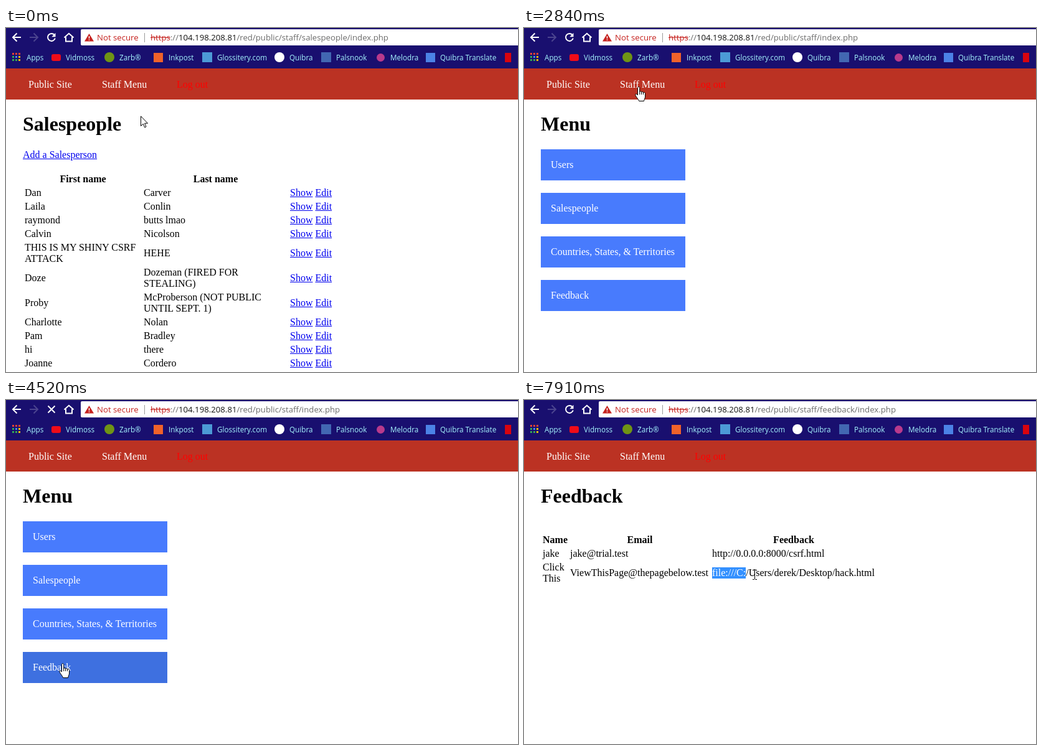
Recreate the animation shown at these times as an HTML page. Size 822x553 px, loop 8000 ms.

```html
<!DOCTYPE html>
<html lang="en">
<head>
<meta charset="utf-8">
<title>Staff area</title>
<style>
html, body { margin: 0; width: 100%; height: 100%; overflow: hidden; background: #fff; }
#stage { position: relative; width: 822px; height: 553px; overflow: hidden; font: 16px/18px "Liberation Serif", "Times New Roman", serif; color: #000; white-space: nowrap; }
#stage > *, .page > *, .nav *, .marks *, .bar > * { position: absolute; }

/* browser frame */
.top { left: 0; top: 0; width: 822px; height: 65px; background: #190f6f; }
.bar { left: 120px; top: 2px; width: 710px; height: 26px; background: #fff; border-radius: 2px; font: 13.2px/26px "Open Sans", "Noto Sans", sans-serif; }
.warn { left: 26px; color: #c5221f; }
.rule { left: 102px; top: 6px; width: 1px; height: 15px; background: #9a9a9a; }
.url { left: 112px; color: #6b6b6b; }
.url s { color: #c5221f; }
.url b { font-weight: 400; color: #111; }
.path { position: relative; }
.path i { position: absolute; left: 0; top: -4px; font-style: normal; line-height: 26px; }
.marks { left: 0; top: 37px; font: 11.7px/20px "Open Sans", "Noto Sans", sans-serif; color: #a6f6ff; }
.nav { left: 0; top: 65px; width: 822px; height: 50px; background: #bb3223; color: #fff; }
.nav span { top: 17px; }

/* pages */
.page { left: 0; top: 115px; width: 822px; height: 438px; background: #fff; }
h1 { margin: 0; left: 27px; top: 21px; font-size: 32px; line-height: 37px; }
u { color: #00e; }
table { left: 27px; border-spacing: 2px; table-layout: fixed; }
td, th { padding: 1px; box-sizing: border-box; }
td { text-align: left; }
.btn { left: 27px; width: 216px; height: 50px; padding-left: 16px; line-height: 50px; color: #fff; background: #487bfd; }
.sel { left: 302px; top: 154px; color: #fff; background: #3390ff; }

/* timing */
.t { animation: 8s step-end infinite; }
#sales { animation-name: sales; }
#menu { animation-name: menu; }
#feed { animation-name: feed; }
#u1 { animation-name: u1; }
#u2 { animation-name: u2; }
#u3 { animation-name: feed; }
#load { animation-name: load; }
#stop { animation-name: stop; }
#b1 { animation-name: b1; }
#b2 { animation-name: b2; }
#b3 { animation-name: b3; }
#b4 { animation-name: b4; }
#s1 { animation-name: s1; }
#s2 { animation-name: s2; }
#arrow { animation-name: arrow; }
#hand { animation-name: hand; }
#beam { animation-name: beam; }
#cursor { left: 0; top: 0; animation-name: move; }
#cursor svg { position: absolute; overflow: visible; }

@keyframes sales { 0% { visibility: visible } 35.5%, 100% { visibility: hidden } }
@keyframes menu { 0% { visibility: hidden } 35.5% { visibility: visible } 58.375%, 100% { visibility: hidden } }
@keyframes feed { 0% { visibility: hidden } 58.375%, 100% { visibility: visible } }
@keyframes u1 { 0% { visibility: visible } 33.625%, 100% { visibility: hidden } }
@keyframes u2 { 0% { visibility: hidden } 33.625% { visibility: visible } 58.375%, 100% { visibility: hidden } }
@keyframes load { 0%, 35.5%, 58.375%, 100% { opacity: 1 } 26.875%, 56.5% { opacity: 0 } }
@keyframes stop { 0%, 35.5%, 58.375%, 100% { opacity: 0 } 26.875%, 56.5% { opacity: 1 } }
@keyframes b1 { 0%, 44.5%, 100% { background: #487bfd } 42.75% { background: #3e70e0 } }
@keyframes b2 { 0%, 49.75%, 100% { background: #487bfd } 44.5% { background: #3e70e0 } }
@keyframes b3 { 0%, 53.25%, 100% { background: #487bfd } 49.75% { background: #3e70e0 } }
@keyframes b4 { 0% { background: #487bfd } 53.25%, 100% { background: #3e70e0 } }
@keyframes s1 { 0%, 98.875%, 100% { opacity: 0 } 97% { opacity: 1 } }
@keyframes s2 { 0% { opacity: 0 } 98.875%, 100% { opacity: 1 } }
@keyframes arrow {
  0%, 41.125%, 48%, 51.5%, 65.375% { opacity: 1 }
  13.625%, 42.75%, 49.75%, 53.25%, 70.625%, 100% { opacity: 0 }
}
@keyframes hand {
  0%, 41.125%, 48%, 51.5%, 65.375%, 100% { opacity: 0 }
  13.625%, 42.75%, 49.75%, 53.25% { opacity: 1 }
}
@keyframes beam { 0% { opacity: 0 } 70.625%, 100% { opacity: 1 } }
@keyframes move {
  0% { transform: translate(216px, 141px) }
  1.875% { transform: translate(218px, 141px) }
  5.25% { transform: translate(217px, 139px) }
  6.875% { transform: translate(214px, 134px) }
  8.625% { transform: translate(210px, 128px) }
  10.25% { transform: translate(206px, 122px) }
  12% { transform: translate(201px, 115px) }
  13.625% { transform: translate(196px, 107px) }
  15.375% { transform: translate(192px, 100px) }
  17% { transform: translate(189px, 96px) }
  18.5% { transform: translate(184px, 94px) }
  41.125% { transform: translate(152px, 165px) }
  42.75% { transform: translate(125px, 240px) }
  44.5% { transform: translate(117px, 272px) }
  46.25% { transform: translate(109px, 306px) }
  48% { transform: translate(104px, 332px) }
  49.75% { transform: translate(98px, 366px) }
  51.5% { transform: translate(94px, 398px) }
  53.25% { transform: translate(91px, 423px) }
  65.375% { transform: translate(150px, 395px) }
  67.125% { transform: translate(240px, 335px) }
  68.875% { transform: translate(320px, 291px) }
  70.625% { transform: translate(364px, 275px) }
  75.625% { transform: translate(395px, 283px) }
  77.375% { transform: translate(386px, 282px) }
  79.125% { transform: translate(373px, 281px) }
  80.875% { transform: translate(357px, 280px) }
  82.5% { transform: translate(341px, 279px) }
  84.25% { transform: translate(327px, 279px) }
  86% { transform: translate(316px, 279px) }
  87.75% { transform: translate(308px, 279px) }
  89.625% { transform: translate(306px, 279px) }
  91.5% { transform: translate(305px, 279px) }
  97% { transform: translate(334px, 280px) }
  98.875%, 100% { transform: translate(370px, 281px) }
}
</style>
</head>
<body>
<div id="stage">
  <div class="top"></div>
  <div class="bar">
    <span class="warn">Not secure</span><span class="rule"></span>
    <span class="url"><s>https</s>://<b>104.198.208.81</b><span class="path"><i class="t" id="u1">/red/public/staff/salespeople/index.php</i><i class="t" id="u2">/red/public/staff/index.php</i><i class="t" id="u3">/red/public/staff/feedback/index.php</i></span></span>
  </div>
  <svg style="left:0;top:0" width="160" height="65" fill="none" stroke="#fff" stroke-width="2">
    <path d="M24 15H11.500M17.500 8.500L11 15l6.500 6.500"/>
    <path d="M38 15h12.500M44.500 8.500L51 15l-6.500 6.500" stroke="#4b448f"/>
    <g class="t" id="load"><path d="M77.600 11A6 6 0 1 0 78.800 16.500"/><path d="M79.500 8v6.200h-6.200z" fill="#fff" stroke="none"/></g>
    <path class="t" id="stop" d="M67.500 9.500l11 11M78.500 9.500l-11 11"/>
    <path d="M93.500 15.500L101 8.800l7.500 6.700M96 14.500v7h10v-7"/>
    <path d="M133.500 9l7.500 12.500h-15z" fill="#c5221f" stroke="none"/>
    <path d="M133.500 13v4M133.500 18.200v1.600" stroke-width="1.500"/>
    <g stroke="none" id="grid"></g>
  </svg>
  <div class="marks" id="marks"></div>

  <div class="nav">
    <span style="left:36px">Public Site</span>
    <span style="left:154px">Staff Menu</span>
    <span style="left:274px;color:red">Log out</span>
  </div>

  <div class="page t" id="sales">
    <h1>Salespeople</h1>
    <u style="left:27px;top:80px">Add a Salesperson</u>
    <table style="top:116px;width:500px">
      <thead><tr><th style="width:189px">First name</th><th style="width:233px">Last name</th><th></th></tr></thead>
      <tbody id="people"></tbody>
    </table>
  </div>

  <div class="page t" id="menu">
    <h1>Menu</h1>
    <div class="btn t" id="b1" style="top:80px">Users</div>
    <div class="btn t" id="b2" style="top:150px">Salespeople</div>
    <div class="btn t" id="b3" style="top:220px">Countries, States, &amp; Territories</div>
    <div class="btn t" id="b4" style="top:290px">Feedback</div>
  </div>

  <div class="page t" id="feed">
    <h1>Feedback</h1>
    <table style="top:98px;width:540px">
      <tr><th style="width:42px">Name</th><th style="width:226px">Email</th><th>Feedback</th></tr>
      <tr><td>jake</td><td>jake@trial.test</td><td>http://0.0.0.0:8000/csrf.html</td></tr>
      <tr><td>Click<br>This</td><td>ViewThisPage@thepagebelow.test</td><td>file:///C:/Users/derek/Desktop/hack.html</td></tr>
    </table>
    <span class="sel t" id="s1">file</span>
    <span class="sel t" id="s2">file:///C:</span>
  </div>

  <div class="t" id="cursor">
    <svg class="t" id="arrow" style="left:0;top:0" width="13" height="20"><path d="M.5 .8V16.500L4.200 13.100 6.700 18.800 9 17.800 6.600 12.200H11.500Z" fill="#fff" stroke="#000"/></svg>
    <svg class="t" id="hand" style="left:-6px;top:0" width="18" height="25">
      <path d="M4.500 14V2.300C4.500 .1 7.700 .1 7.700 2.300V8.800C7.800 7.400 10.500 7.500 10.600 9.200 10.800 8 13.400 8.200 13.500 10 13.800 9 16.600 9.200 16.600 11.500V16C16.600 19 14.900 20 14.600 23.500H6.700C6 21 2.500 17.500 1 14.200 .1 12 2.600 10.900 4.500 14Z" fill="#fff" stroke="#000"/>
      <path d="M7.700 8.500V13M10.600 9V13M13.500 10V13" stroke="#000"/>
    </svg>
    <svg class="t" id="beam" style="left:-4px;top:-8px" width="8" height="16"><path d="M1 .5H3.500L4.500 1.500 5.500 .5H8M4.500 1V15M1 15.500H3.500L4.500 14.500 5.500 15.500H8" fill="none" stroke="#000"/></svg>
  </div>
</div>
<script>
const put = (id, html) => document.getElementById(id).innerHTML = html;

const people = [
  ["Dan", "Carver"], ["Laila", "Conlin"], ["raymond", "butts lmao"], ["Calvin", "Nicolson"],
  ["THIS IS MY SHINY CSRF<br>ATTACK", "HEHE"],
  ["Doze", "Dozeman (FIRED FOR<br>STEALING)"],
  ["Proby", "McProberson (NOT PUBLIC<br>UNTIL SEPT. 1)"],
  ["Charlotte", "Nolan"], ["Pam", "Bradley"], ["hi", "there"], ["Joanne", "Cordero"]
];
put("people", people.map(([first, last]) =>
  `<tr><td>${first}</td><td>${last}</td><td><u>Show</u> <u>Edit</u></td></tr>`).join(""));

// label, text x, icon centre x, colour, width, height, corner radius
const marks = [
  ["Vidmoss", 96, 80, "#f00c18", 15, 11, 3],
  ["Zarb®", 182, 166, "#6f9415", 16, 16, 8],
  ["Inkpost", 261, 244, "#f0622a", 15, 15, 0],
  ["Glossitery.com", 339, 323, "#4c9ad6", 16, 16, 0],
  ["Quibra", 455, 439, "#fff", 16, 16, 8],
  ["Palsnook", 530, 514, "#4267b2", 16, 16, 0],
  ["Melodra", 617, 601, "#b83a8c", 13, 13, 7],
  ["Quibra Translate", 697, 681, "#4b82e6", 15, 15, 0],
  ["", 822, 806, "#d8040e", 10, 15, 0]
];
put("marks", '<span style="left:33px">Apps</span>' + marks.map(([label, x, cx, fill, w, h, r]) =>
  `<i style="left:${cx - w / 2}px;top:${10 - h / 2}px;width:${w}px;height:${h}px;border-radius:${r}px;background:${fill}"></i>` +
  `<span style="left:${x}px">${label}</span>`).join(""));

const dots = ["#ea4335", "#ea4335", "#ea4335", "#34a853", "#4285f4", "#fbbc05", "#34a853", "#34a853", "#fbbc05"];
put("grid", dots.map((c, i) =>
  `<rect x="${10 + i % 3 * 5}" y="${40 + (i / 3 | 0) * 5}" width="3" height="3" fill="${c}"/>`).join(""));
</script>
</body>
</html>
```
